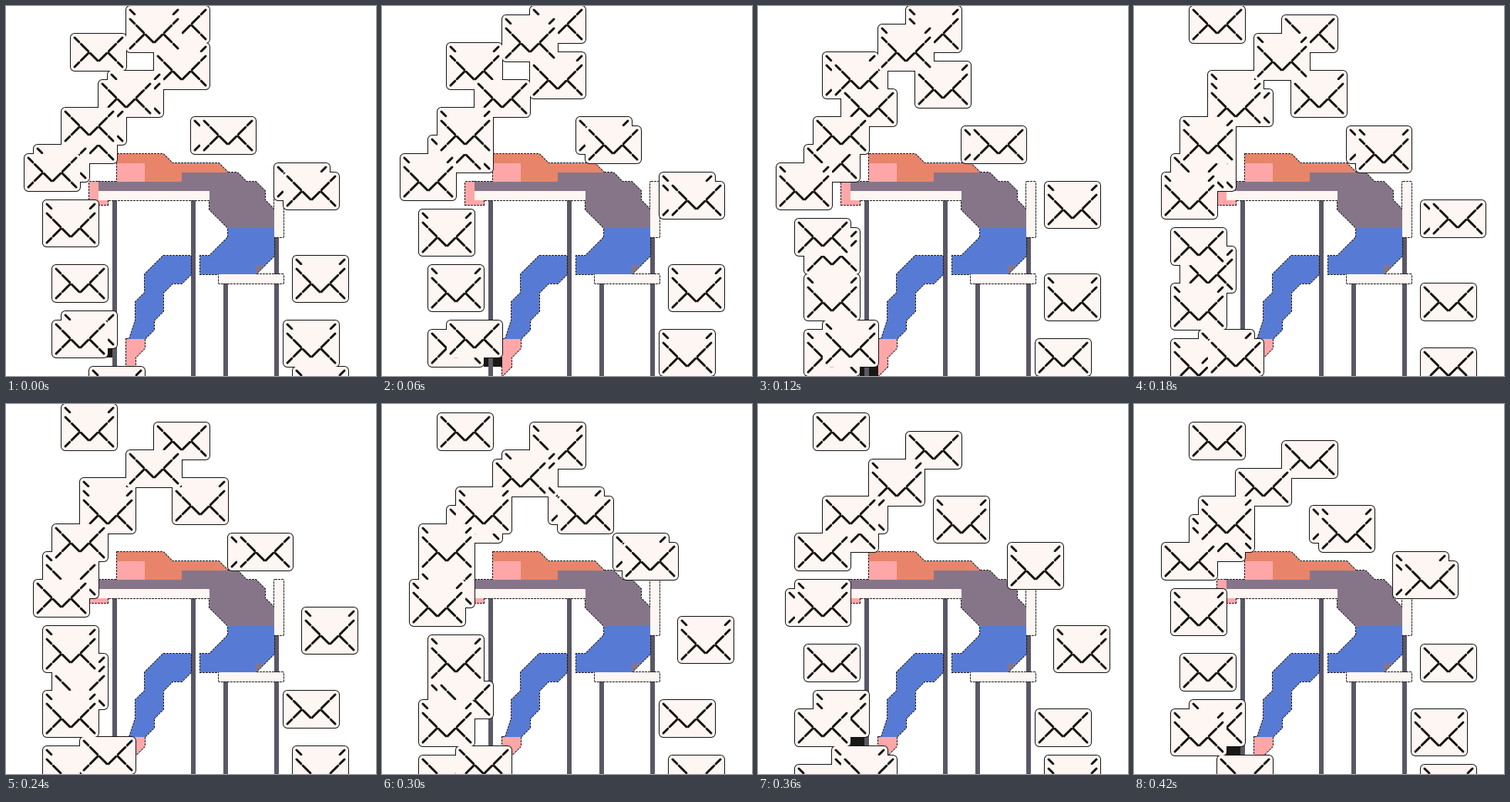
Recreate the animation shown at these times as an HTML page. Size 480 by 480 pixels, loop 0.48 s.

```html
<!DOCTYPE html>
<html lang="en">
<head>
<meta charset="utf-8">
<title>Buried in mail</title>
<style>
html, body { margin: 0; width: 100%; height: 100%; overflow: hidden; background: #fff; }
svg { display: block; width: 100%; height: 100%; }
.edge { fill: #111; stroke: #111; stroke-width: 2; }
.paper { fill: #fdf6f2; }
.fold { fill: none; stroke: #15120f; stroke-width: 3; stroke-linecap: round; stroke-dasharray: 13.5 3.47; stroke-dashoffset: 5.3; }
.outline { stroke: #1c1a1c; stroke-width: 2; stroke-dasharray: 3 1; }
.skin { fill: #ffa6a8; }
.hair { fill: #e8846a; }
.shirt { fill: #867589; }
.jeans { fill: #577bd4; }
</style>
</head>
<body>
<svg viewBox="0 0 480 480">
  <defs>
    <rect id="edge" class="edge" width="72" height="48" rx="5"/>
    <g id="mail">
      <rect class="paper" width="72" height="48" rx="5"/>
      <path class="fold" d="M5 5 36 36M67 5 36 36M5 43 24 24M67 43 48 24"/>
    </g>
    <g id="sleeper">
      <path class="skin" d="M156 432h24v12l-12 12v12l-12 12z"/>
      <path class="jeans" d="M204 324h36v24l-12 12h-12l-12 12v24l-12 12v12l-12 12h-20l8-24v-24l12-12v-24z"/>
      <path class="jeans" d="M288 288h60v36l-24 24h-72v-24h12l24-24z"/>
      <path class="hair" d="M144 192h60l12 12h60l12 12v12H144z"/>
      <path class="shirt" d="M120 228h108v-12h72l12 12h12l12 12v12l12 12v24h-60l-24-24v-24H120z"/>
      <path class="skin" d="M108 228h12v24h12v6h-24z"/>
      <rect class="paper" x="120" y="240" width="144" height="12"/>
      <rect class="paper" x="276" y="348" width="84" height="12" rx="1"/>
      <rect class="paper" x="348" y="228" width="12" height="72" rx="1"/>
    </g>
  </defs>
  <g id="shade" fill="#1a1815"></g>
  <path fill="#5b5764" d="M138 252h6v228h-6zM240 252h6v228h-6zM282 360h6v120h-6zM348 300h6v180h-6z"/>
  <use class="outline" href="#sleeper"/>
  <use href="#sleeper"/>
  <path class="skin" d="M144 204h36v24h-36z"/>
  <path class="shirt" d="M324 336h12l-12 12z"/>
  <g id="mails"></g>
</svg>
<script>
const CELL = 12, STEP = 60, STEPS = 8, LIFE = 48;

// Bends of the three streams: step, column, row
const outer = [
  [3, 6, 0.05], [7, 6.4, 1.97], [12, 8.25, 9.3], [20, 4.7, 13], [24, 2.35, 15.7],
  [27, 2.55, 18.6], [32, 4.2, 21.6], [38, 5.8, 31.95], [48, 9.2, 39.2]
];
const inner = [
  [-0.7, 13, 0], [4, 13.2, 5.2], [8, 10.2, 7.9], [12, 7.8, 9.9], [20, 3.8, 17],
  [24, 3.7, 21.8], [32, 5.2, 28], [36, 3.8, 31.9], [40, 4.7, 34.3], [46, 4.15, 39.2]
];
const right = [
  [0, 16, -0.4], [8, 15.7, 4.6], [15, 19.7, 11.7], [20, 24.8, 14], [24, 30, 17.7],
  [28, 32.2, 22.55], [32, 30.9, 27.75], [40, 29.9, 34.9], [44, 30.9, 37.7], [48, 31, 39.4]
];

// Nearest grid cell on a stream at step s, or null when off it
function cellAt(path, s) {
  const i = path.findIndex((p, k) => k && s <= p[0]);
  if (i < 0 || s < path[0][0]) return null;
  const [s0, x0, y0] = path[i - 1], [s1, x1, y1] = path[i];
  const k = (s - s0) / (s1 - s0);
  return [Math.round(x0 + (x1 - x0) * k), Math.round(y0 + (y1 - y0) * k)];
}

// Letters of one stream, each with a short trail behind it
function letters(path, step) {
  const out = [];
  for (let s = step; s <= LIFE; s += STEPS) {
    if (!cellAt(path, s)) continue;
    let last = "";
    for (let lag = 3; lag >= 0; lag--) {
      const c = cellAt(path, s - lag / 5);
      if (!c || String(c) === last) continue;
      last = String(c);
      out.push({ s, x: c[0] * CELL, y: c[1] * CELL });
    }
  }
  return out;
}

const use = id => m => `<use href="#${id}" x="${m.x}" y="${m.y}"/>`;

// The outer stream weaves behind and in front of the inner one
const isBehind = m => m.s < 13 || (m.s > 32 && m.s < 41);
const hasShade = m => m.s > 37 && m.s < 43;

function draw(step) {
  const left = letters(outer, step);
  const all = [
    ...letters(right, step),
    ...left.filter(isBehind),
    ...letters(inner, step),
    ...left.filter(m => !isBehind(m))
  ];
  document.getElementById("mails").innerHTML =
    all.map(use("edge")).join("") + all.map(use("mail")).join("");
  document.getElementById("shade").innerHTML = left.filter(hasShade)
    .map(m => `<rect x="${m.x + 48}" y="${m.y + 48}" width="24" height="12"/>`).join("");
}

const start = performance.now();
let shown = -1;
function tick() {
  const step = Math.floor(Math.max(0, performance.now() - start) / STEP) % STEPS;
  if (step !== shown) draw(shown = step);
  requestAnimationFrame(tick);
}
tick();
</script>
</body>
</html>
```
